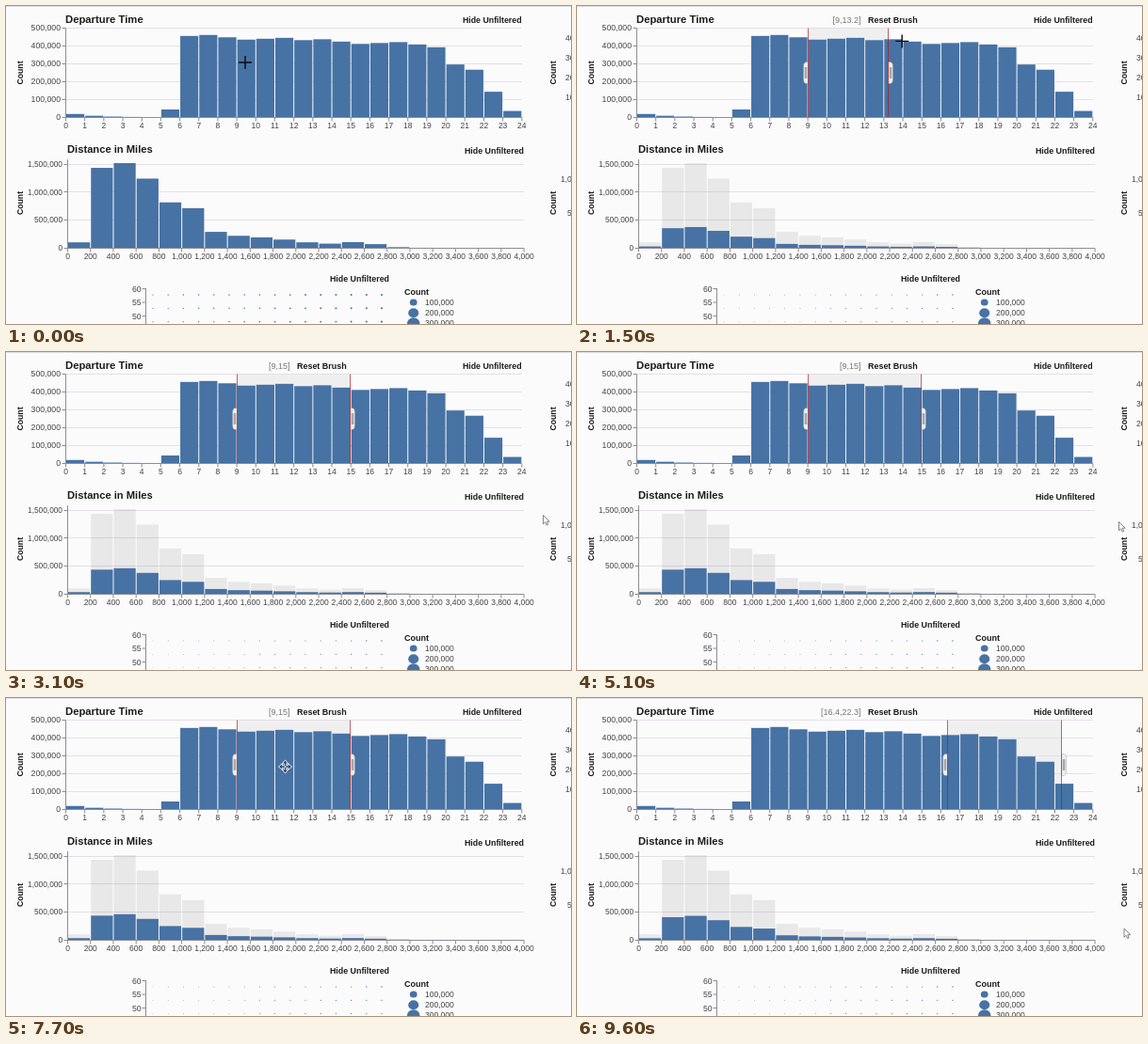
Write an HTML page that moves like this. It is 600 by 338 pixels and loops after 9700 ms.

```html
<!DOCTYPE html>
<html lang="en">
<head>
<meta charset="utf-8">
<title>Linked histograms</title>
<style>
html, body { margin: 0; width: 100%; height: 100%; overflow: hidden; background: #fbfbfc; }
svg { display: block; font-family: "Liberation Sans", Arial, sans-serif; }
</style>
</head>
<body>
<svg id="stage" width="600" height="338" viewBox="0 0 600 338"></svg>
<script>
const LOOP = 9700, STEP = 100, LAG = 100;
const BLUE = '#4772a4', INK = '#1c1c1c', LABEL = '#444', GRID = '#e5dfe6', AXIS = '#8e8e92';
const stage = document.getElementById('stage');

function set(node, attrs) {
  for (const key in attrs) node.setAttribute(key, attrs[key]);
  return node;
}
function el(name, attrs, parent = stage) {
  return parent.appendChild(set(document.createElementNS('http://www.w3.org/2000/svg', name), attrs));
}
const line = (x1, y1, x2, y2, stroke, parent) => el('line', { x1, y1, x2, y2, stroke }, parent);
function text(str, x, y, size, attrs = {}) {
  const node = el('text', { x, y, 'font-size': size, fill: LABEL, ...attrs });
  node.textContent = str;
  return node;
}
const bold = (str, x, y, size, anchor = 'start') =>
  text(str, x, y, size, { 'font-weight': 700, fill: INK, 'text-anchor': anchor });
const sideways = (x, y) => set(bold('Count', 0, 0, 8.7, 'middle'), { transform: `translate(${x} ${y}) rotate(-90)` });
const commas = n => n.toLocaleString('en-US');
const crisp = v => Math.floor(v) + 0.5;
const clamp = (v, lo, hi) => Math.min(hi, Math.max(lo, v));

// Counts in thousands: a daytime plateau, and a sum of distance clusters
const rise = (v, mid, slope) => 1 / (1 + Math.exp((mid - v) * slope));
const peak = (v, mid, width, height) => height * Math.exp(-(((v - mid) / width) ** 2) / 2);

function flightsAt(h) {
  const day = 455 - 4 * (h - 6) + 9 * Math.sin(Math.abs(h - 12) * Math.PI / 2);
  const evening = 100 * rise(h, 19.5, 8) + 270 * rise(h, 21.9, 2);
  return (day - evening) * rise(h, 5.25, 9) + 18 * Math.exp(-0.8 * h);
}
function flightsOver(bin) {
  if (bin === 0) return 98;
  return peak(bin, 1.7, 1.93, 1530) + peak(bin, 5, 0.4, 260) + peak(bin, 7.5, 2.2, 185) + peak(bin, 12.3, 0.8, 85);
}

const time = { x: 63.5, unit: 20.18, base: 118.2, scale: 0.19, bins: 24, count: flightsAt, yStep: 100, yTicks: 5, xStep: 1 };
const dist = { x: 65.5, unit: 24.23, base: 257, scale: 0.0592, bins: 20, count: flightsOver, yStep: 500, yTicks: 3, xStep: 200 };

const level = (c, i) => c.base - i * c.yStep * c.scale;
function grid(c) {
  for (let i = 1; i <= c.yTicks; i++)
    line(c.x, crisp(level(c, i)), c.x + c.unit * c.bins, crisp(level(c, i)), GRID);
}
function axes(c, top, size) {
  const base = crisp(c.base);
  line(c.x, top, c.x, base, AXIS);
  line(c.x, base, c.x + c.unit * c.bins, base, AXIS);
  for (let i = 0; i <= c.yTicks; i++) {
    const y = level(c, i);
    line(c.x - 4, crisp(y), c.x, crisp(y), AXIS);
    text(commas(i * c.yStep * 1000), c.x - 5.5, y + 3, size, { 'text-anchor': 'end' });
  }
  for (let i = 0; i <= c.bins; i++) {
    const x = c.x + i * c.unit;
    line(x, base, x, base + 4, AXIS);
    text(commas(i * c.xStep), x, c.base + 11.7, 8.5, { 'text-anchor': 'middle' });
  }
}
function bars(c, attrs) {
  return Array.from({ length: c.bins }, (_, i) => {
    const height = c.count(i) * c.scale;
    return el('rect', { x: c.x + i * c.unit + 0.5, width: c.unit - 1, y: c.base - height, height, ...attrs });
  });
}

// Backdrop
el('rect', { width: 600, height: 338, fill: '#fbfbfc' });
el('rect', { width: 600, height: 1, fill: '#dcdce4' });

// Departure time
const shade = el('rect', { y: 23.5, height: 95, fill: '#efeff0' });
grid(time);
bars(time, { fill: BLUE });
axes(time, 23.5, 8.7);
bold('Departure Time', 63, 17.5, 11.3);
bold('Hide Unfiltered', 547.5, 18, 8.8, 'end');
sideways(18, 71);

// Distance
grid(dist);
const ghosts = bars(dist, { fill: '#000', 'fill-opacity': 0.075 });
const fills = bars(dist, { fill: BLUE });
axes(dist, 163, 8.3);
bold('Distance in Miles', 65, 156, 11.2);
bold('Hide Unfiltered', 550, 156.5, 8.9, 'end');
sideways(18, 209.5);

// Neighbouring charts, cut off at the right
sideways(584, 71);
sideways(584, 209.5);
for (let i = 0; i < 4; i++) text(commas(40000 - i * 10000), 594, 37 + i * 21, 8.5);
text('1,000', 589, 187, 8.5);
text('500', 596, 223, 8.5);

// Dot matrix and legend
const dots = [];
bold('Hide Unfiltered', 407, 293.4, 8.9, 'end');
bold('Count', 423, 306.5, 9);
line(148.5, 300, 148.5, 338, AXIS);
for (let row = 0; row < 3; row++) {
  const y = 300.5 + row * 14.5;
  line(144.5, y, 148.5, y, AXIS);
  text(60 - row * 5, 143.5, y + 3, 8.6, { 'text-anchor': 'end' });
  for (let col = 0; col < 16; col++)
    dots.push({ size: 0.6 + col * 0.03, node: el('circle', { cx: 156 + col * 16.2, cy: 307 + row * 14.3, fill: BLUE }) });

  const cy = 315 + row * 11.2, rx = 3.9 * Math.sqrt(row + 1);
  el('ellipse', { cx: 432.7, cy, rx, ry: rx * 0.9, fill: BLUE });
  text(commas((row + 1) * 100000), 445, cy + 3, 8.5);
}

// Brush
const brush = el('g', {});
const handles = [-1, 1].map(side => {
  const g = el('g', {}, brush);
  const half = el('g', { transform: `scale(${side} 1)` }, g);
  el('path', {
    d: 'M0 59.5 H1.5 Q5 59.5 5 64 V78 Q5 82.5 1.5 82.5 H0 Z',
    fill: '#eeeeee', stroke: '#8a8a90', 'stroke-opacity': 0.55, 'stroke-width': 0.7
  }, half);
  el('rect', { x: 1.2, y: 65, width: 2.6, height: 12, fill: '#aaa6a8' }, half);
  el('line', { y1: 23.5, y2: 118.5, stroke: '#a81c1c', 'stroke-opacity': 0.68 }, g);
  return g;
});
const range = text('', 301.5, 18, 9, { 'text-anchor': 'end', fill: '#777' });
const reset = bold('Reset Brush', 309, 18, 8.95);

// Pointers
const pointers = { cross: el('g', {}), move: el('g', {}), arrow: el('g', {}) };
el('path', { d: 'M-7 0 H7 M0 -7 V7', stroke: '#0c0c10', 'stroke-width': 1.4 }, pointers.cross);
const tip = 'M-0.7 -0.7 V-3.6 H-2.4 L0 -6.4 L2.4 -3.6 H0.7 V-0.7 Z';
for (const fill of ['none', '#2b4468'])
  for (let turn = 0; turn < 360; turn += 90)
    el('path', { d: tip, fill, stroke: fill === 'none' ? '#f4f6fa' : 'none', 'stroke-width': 1.5, transform: `rotate(${turn})` }, pointers.move);
el('path', {
  d: 'M0 0 V9.3 L2.2 7.3 L3.7 10.6 L5.2 9.9 L3.8 6.7 H6.7 Z',
  fill: '#ffffff', stroke: '#77777c', 'stroke-width': 0.9, 'stroke-linejoin': 'round'
}, pointers.arrow);

const glide = k => k * k * (3 - 2 * k);
const drag = k => 1 - (1 - k) ** 3.5;
const HOME = [254, 60], GRAB = [296.5, 73];
// Pointer moves: start, end, goal, easing
const moves = [
  [0, 1100, [245, 42], glide],
  [1100, 2100, [365.3, 36.5], drag],
  [2200, 3100, [570.5, 173.5], glide],
  [3100, 3500, [580, 182], glide],
  [3500, 4000, [575.5, 180.5], glide],
  [5100, 5500, [581, 184], glide],
  [5500, 6100, [574, 180], glide],
  [6400, 7300, GRAB, glide],
  [7700, 8500, [411, 76], drag],
  [8500, 8900, [445.2, 77], drag],
  [9000, 9600, [581, 245], glide]
];
function pointerAt(t) {
  return moves.reduce((from, [start, end, goal, ease]) => {
    const k = ease(clamp((t - start) / (end - start), 0, 1));
    return from.map((v, i) => v + (goal[i] - v) * k);
  }, HOME);
}

// Share of flights inside the brush
const shares = [[1100, 0], [1500, 0.245], [2100, 0.302], [7700, 0.302], [8500, 0.348], [8900, 0.283]];
function shareAt(t) {
  return shares.reduce((kept, [when, goal], i) => {
    const since = i ? shares[i - 1][0] : 0;
    return kept + (goal - kept) * clamp((t - since) / (when - since), 0, 1);
  }, 0);
}

function draw(t) {
  const active = t > 1100;
  const visibility = active ? 'visible' : 'hidden';
  const shift = pointerAt(clamp(t, 7700, 9000) - LAG)[0] - GRAB[0];
  const left = 245 + shift;
  const right = pointerAt(clamp(t, 1200, 2200) - LAG)[0] + shift;
  for (const node of [shade, brush, range, reset, ...ghosts]) set(node, { visibility });
  set(shade, { x: left, width: right - left });
  [left, right].forEach((x, i) => set(handles[i], { transform: `translate(${crisp(x)} 0)` }));
  range.textContent = `[${[left, right].map(x => +((x - time.x) / time.unit).toFixed(1))}]`;

  const kept = active ? shareAt(t) : 1;
  fills.forEach((bar, i) => {
    const height = dist.count(i) * dist.scale * kept;
    set(bar, { y: dist.base - height, height });
  });
  for (const { node, size } of dots) set(node, { r: size * (active ? 0.62 : 1) });

  const [x, y] = pointerAt(t);
  const inChart = x > 63 && x < 548 && y > 23 && y < 119;
  const inBrush = t > 2200 && x > left && x < right;
  const kind = !inChart ? 'arrow' : inBrush ? 'move' : 'cross';
  for (const name in pointers)
    set(pointers[name], { visibility: name === kind ? 'visible' : 'hidden', transform: `translate(${x} ${y})` });
}

const start = performance.now();
function tick() {
  const t = (performance.now() - start) % LOOP;
  draw(Math.floor(t / STEP) * STEP);
  requestAnimationFrame(tick);
}
tick();
</script>
</body>
</html>
```
